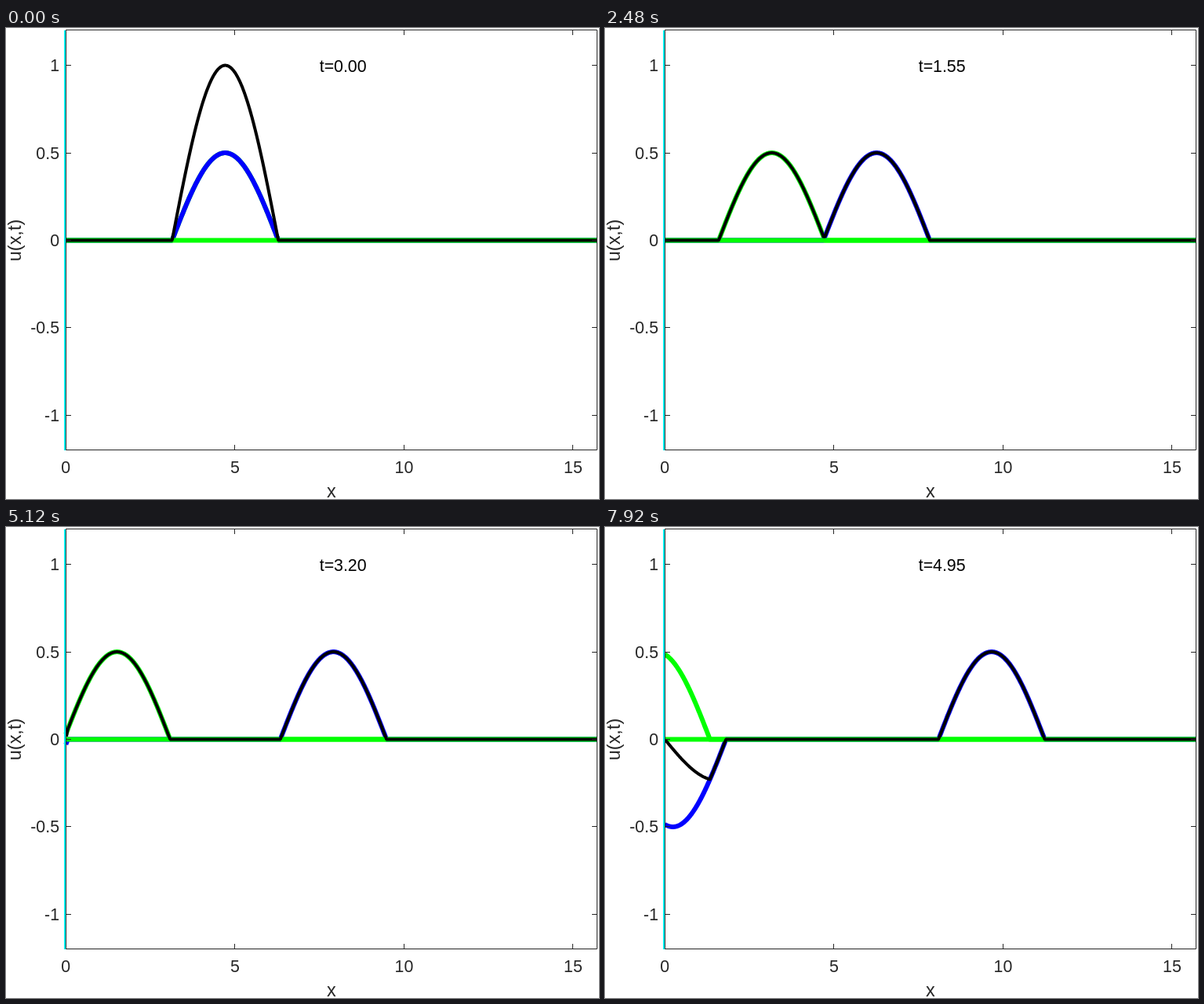
An HTML page with a canvas that plays this animation: 756 by 600 pixels, repeating every 8000 ms.

```html
<!DOCTYPE html>
<html>
<head>
<meta charset="utf-8">
<style>
html, body { margin: 0; width: 100%; height: 100%; overflow: hidden; background: #fff; }
canvas { display: block; }
</style>
</head>
<body>
<canvas id="stage" width="756" height="600"></canvas>
<script>
const ctx = document.getElementById('stage').getContext('2d');
const LEFT = 76.3, RIGHT = 753.5, TOP = 2.5, BOTTOM = 537.5, ZERO = 270.5;
const SX = (RIGHT - LEFT) / (5 * Math.PI), SY = 222.9;
const STEP = 80, FRAMES = 100, DT = 0.05;
const GRAY = '#262626';

const px = x => LEFT + x * SX;
const py = y => ZERO - y * SY;

// Half of the initial hump, which lies between pi and 2 pi
const hump = x => x > Math.PI && x < 2 * Math.PI ? -Math.sin(x) / 2 : 0;

function curve(fn, color, width, start = LEFT) {
  ctx.beginPath();
  for (let p = start; p <= RIGHT; p += 0.5) ctx.lineTo(p, py(fn((p - LEFT) / SX)));
  ctx.strokeStyle = color;
  ctx.lineWidth = width;
  ctx.lineJoin = 'round';
  ctx.stroke();
}

function label(text, x, y, align, size = 21.33, color = GRAY) {
  ctx.font = size + 'px "Liberation Sans", Arial, sans-serif';
  ctx.textAlign = align;
  ctx.fillStyle = color;
  ctx.fillText(text, x, y);
}

function axes() {
  const snap = v => Math.floor(v) + 0.5;
  ctx.strokeStyle = GRAY;
  ctx.lineWidth = 1;
  ctx.beginPath();
  ctx.rect(76.5, TOP, RIGHT - 76.5, BOTTOM - TOP);
  const tick = (x, y, dx, dy) => { ctx.moveTo(x, y); ctx.lineTo(x + dx, y + dy); };
  for (const v of [0, 5, 10, 15]) {
    const x = snap(px(v));
    tick(x, BOTTOM, 0, -6.5);
    tick(x, TOP, 0, 6.5);
    label(v, px(v), 567, 'center');
  }
  for (const v of [-1, -0.5, 0, 0.5, 1]) {
    const y = snap(py(v));
    tick(76.5, y, 6.5, 0);
    tick(RIGHT, y, -6.5, 0);
    label(v, 68, Math.round(py(v) + 7.5), 'right');
  }
  ctx.stroke();
  label('x', 414.8, 598, 'center', 23.46);
  ctx.save();
  ctx.translate(19, 270.5);
  ctx.rotate(-Math.PI / 2);
  label('u(x,t)', 0, 0, 'center', 23.46);
  ctx.restore();
}

function draw(t) {
  const toLeft = x => hump(x + t);
  const toRight = x => hump(x - t) - hump(t - x);
  ctx.fillStyle = '#fff';
  ctx.fillRect(0, 0, 756, 600);
  curve(toLeft, '#0f0', 6);
  curve(toRight, '#00f', 6);
  curve(() => 0, '#0f0', 6);
  curve(x => toLeft(x) + toRight(x), '#000', 4, 77);
  ctx.fillStyle = '#0ff';
  ctx.fillRect(74, 3, 3, 535);
  axes();
  label('t=' + t.toFixed(2), 399.7, 56, 'left', 21.33, '#000');
}

const begin = performance.now();
function loop() {
  const frame = Math.floor((performance.now() - begin) / STEP) % FRAMES;
  draw(frame * DT);
  requestAnimationFrame(loop);
}
loop();
</script>
</body>
</html>
```
